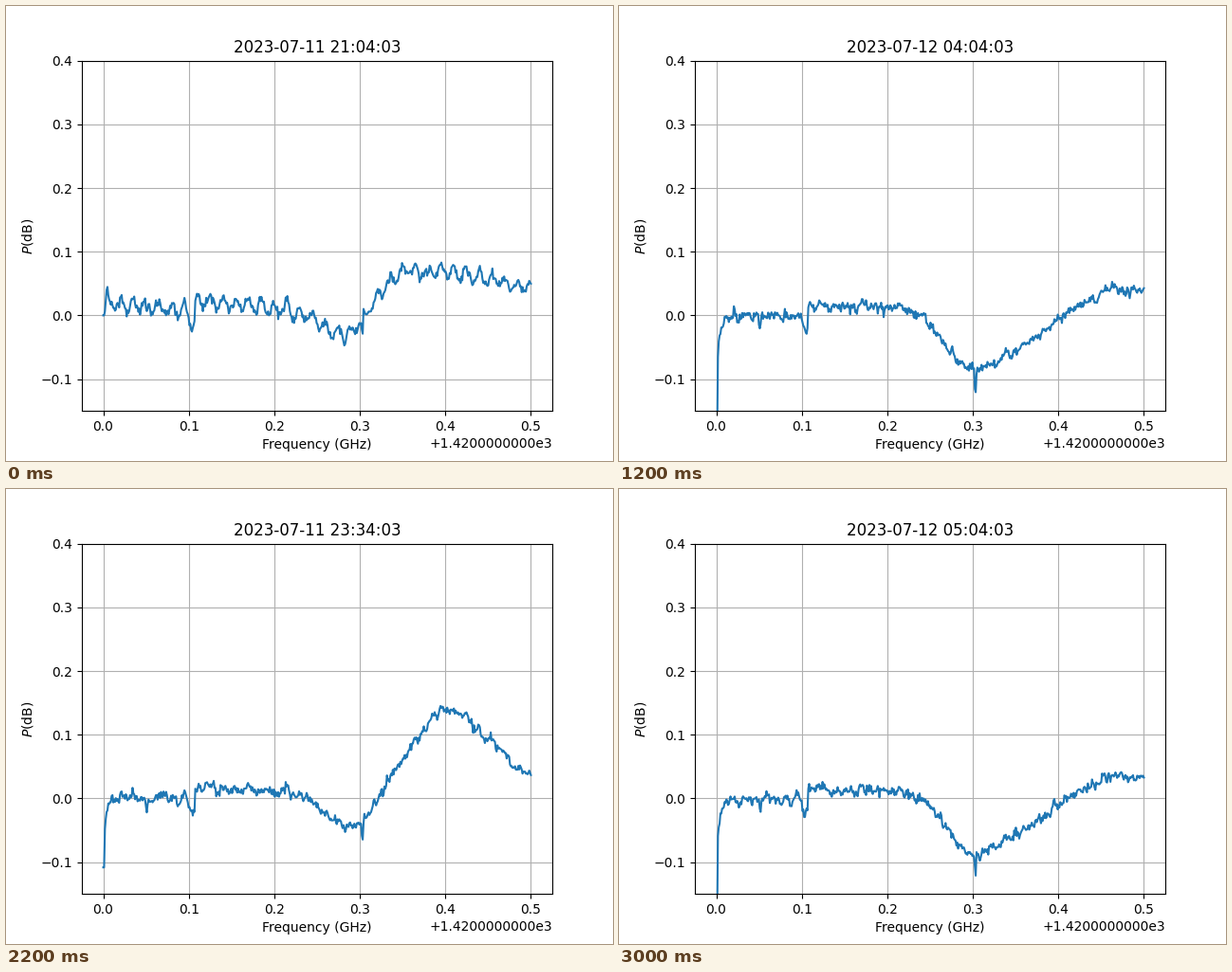
These frames come from a looping animation (640x480 px, 3100 ms). A matplotlib script:

```python
import matplotlib.pyplot as plt
import numpy as np
from matplotlib.animation import FuncAnimation
from matplotlib.ticker import ScalarFormatter

SAMPLES = 512
x = np.linspace(0, 0.5, SAMPLES)

# Half hours since the first recording. They play in unsorted order,
# and the first one stays for two steps.
ORDER = [0, 0, 27, 20, 2, 29, 19, 1, 12, 22, 8, 4, 14, 26, 10, 6,
         17, 9, 3, 24, 13, 28, 5, 21, 11, 25, 18, 7, 23, 15, 16]


def bump(center, left, right=None):
    """Gaussian with separate widths on its two sides."""
    width = np.where(x < center, left, right or left)
    return np.exp(-((x - center) / width) ** 2)


def smooth_noise(rng, size, width):
    raw = np.convolve(rng.normal(size=SAMPLES), np.hanning(width), "same")
    return size * raw / raw.std()


# Receiver artefacts that every spectrum shares
shared = (smooth_noise(np.random.default_rng(4), 0.0026, 9)
          + 0.013 * (x >= 0.107)
          - 0.022 * np.clip((x - 0.096) / 0.006, 0, 1) * (x < 0.107)
          + 0.010 * (bump(0.021, 0.0012) + bump(0.44, 0.0012))
          - 0.036 * bump(0.303, 0.001))


def over_night(hour, *values):
    """Follow a value through its levels at the key hours."""
    return np.interp(hour, [0, 3, 6, 10, 12], values)


def absorption(hour):
    depth = over_night(hour, 0.045, 0.062, 0.096, 0.100, 0.097)
    center = over_night(hour, 0.285, 0.290, 0.298, 0.302, 0.302)
    right = over_night(hour, 0.020, 0.038, 0.084, 0.090, 0.090)
    return depth * bump(center, 0.045, right)


def emission(hour):
    height = over_night(hour, 0.060, 0.138, 0.036, 0.012, -0.012)
    center = over_night(hour, 0.360, 0.408, 0.475, 0.480, 0.480)
    left = over_night(hour, 0.035, 0.056, 0.060, 0.060, 0.060)
    right = over_night(hour, 0.160, 0.060, 0.035, 0.035, 0.060)
    return height * bump(center, left, right)


def spectrum(k):
    hour = k / 2
    rng = np.random.default_rng(100 + k)
    warm = np.interp(hour, [0, 3, 8, 10], [0.7, 0, 0, 1])
    ripple = over_night(hour, 0.009, 0.001, 0.001, 0.001, 0.004)

    y = shared + emission(hour) - absorption(hour)
    y += ripple * np.cos(2 * np.pi * (x - 0.02) / 0.015)
    y += warm * (np.clip(0.026 - 0.14 * x, 0, None)
                 + 0.030 * bump(0.0045, 0.002))
    y -= (1 - warm) * 0.1 * np.exp(-x / 0.004)
    y -= (1 - 0.6 * warm) * 0.02 * bump(0.051, 0.0016)
    y += smooth_noise(rng, 0.0022, 7) + rng.normal(0, 0.0034, SAMPLES)
    y[:2] = np.interp(hour, [0, 3, 6, 8, 10], [0, -0.13, -0.2, -0.2, 0.04])
    return y


def stamp(k):
    m = 21 * 60 + 4 + 30 * k
    return f"2023-07-{11 + m // 1440} {m // 60 % 24:02}:{m % 60:02}:03"


fig, ax = plt.subplots(figsize=(6.4, 4.8), dpi=100)
line, = ax.plot(x, spectrum(0))
title = ax.set_title(stamp(0))
ax.set_ylim(-0.15, 0.4)
ax.set_xlabel("Frequency (GHz)")
ax.set_ylabel("$P$(dB)")
ax.grid()

ticks = ScalarFormatter()
ticks.get_offset = lambda: "+1.4200000000e3"
ax.xaxis.set_major_formatter(ticks)


def update(step):
    k = ORDER[step]
    line.set_ydata(spectrum(k))
    title.set_text(stamp(k))
    return line, title


anim = FuncAnimation(fig, update, frames=len(ORDER), interval=100,
                     repeat=True, repeat_delay=0)
plt.show()
```
